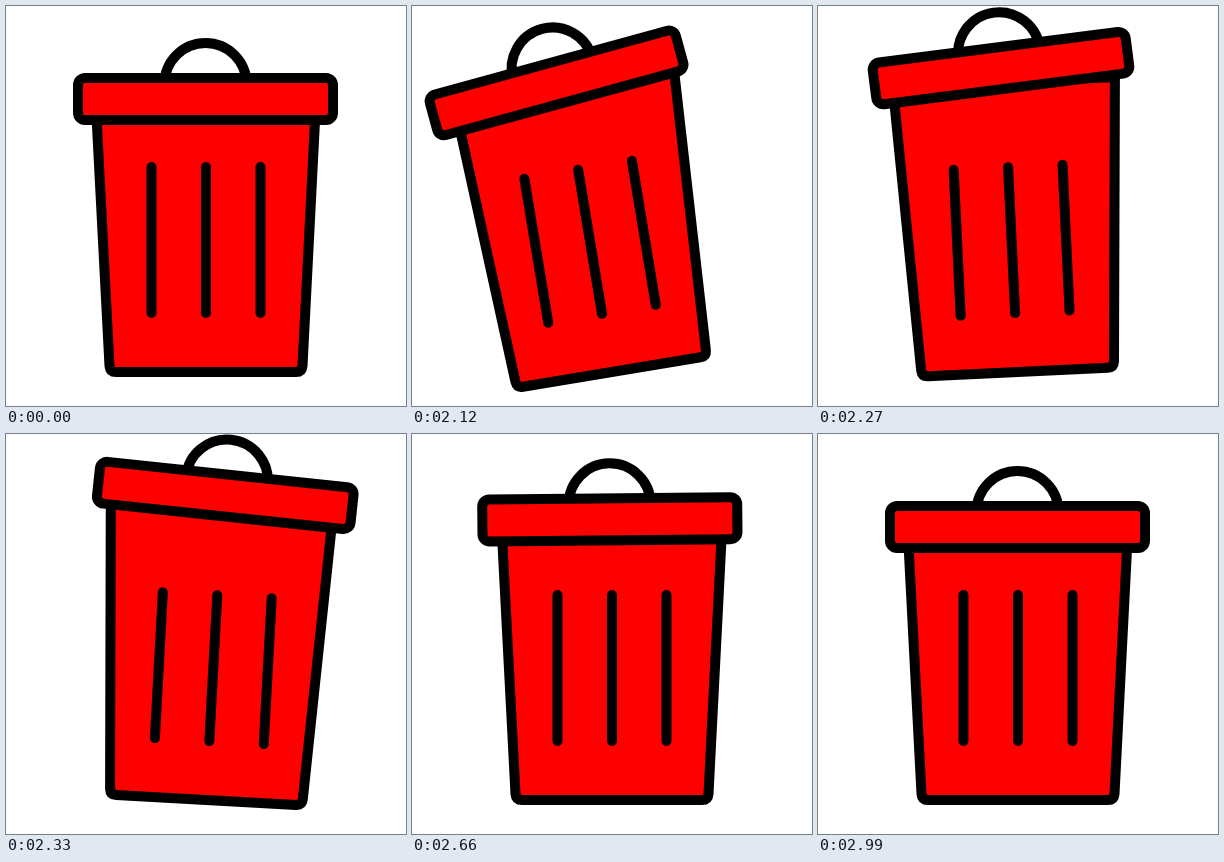
Write an HTML page that moves like this. It is 400 by 400 pixels and loops after 3080 ms.

```html
<!DOCTYPE html>
<html lang="en">
<head>
<meta charset="utf-8">
<title>Bin</title>
<style>
  html, body { margin: 0; width: 100%; height: 100%; overflow: hidden; background: #fff; }
  svg { display: block; width: 100%; height: 100%; }
</style>
</head>
<body>
<svg viewBox="0 0 400 400" fill="red" stroke="#000" stroke-width="10" stroke-linecap="round" stroke-linejoin="round">
  <g id="body">
    <path d="M88.7 76H311L296.5 360Q296 366 290 366H110Q104 366 103.5 360Z"/>
    <path d="M145.5 161V307M200 161V307M254.500 161V307"/>
  </g>
  <g id="lid">
    <path d="M158.500 78A41 41 0 0 1 240.500 78" fill="none"/>
    <rect x="72" y="72" width="255" height="42" rx="7"/>
  </g>
</svg>
<script>
const LOOP = 3080, REST = 2000, STEP = 30;
const body = document.getElementById('body');
const lid = document.getElementById('lid');

// Keys are [ms after the rest, value]; negative times make the start abrupt.
const tilt = [[-150, 9.9], [150, -9.9], [180, -9.9], [355, 3.8], [570, 0]];
const lidTurn = [[-190, 18], [186, -18], [396, 13], [670, -0.6], [850, 0]];
const lidX = [[-145, 57], [145, -57], [185, -57], [355, 24], [535, -5], [740, 0]];
const lidY = [[-110, 5], [310, -31.7], [830, 0]];

// Sine ease-in-out between neighbouring keys.
function at(keys, t) {
  const i = keys.findIndex(k => k[0] > t);
  if (t <= 0 || i < 0) return 0;
  const [t0, a] = keys[i - 1], [t1, b] = keys[i];
  return a + (b - a) * (1 - Math.cos(Math.PI * (t - t0) / (t1 - t0))) / 2;
}

function draw(now) {
  const t = Math.max(0, Math.floor((now % LOOP - REST) / STEP) * STEP);
  body.setAttribute('transform', `rotate(${at(tilt, t)} 200 368)`);
  lid.setAttribute('transform',
    `translate(${at(lidX, t)} ${at(lidY, t)}) rotate(${at(lidTurn, t)} 199.5 93)`);
}

const start = performance.now();
function frame() {
  draw(performance.now() - start);
  requestAnimationFrame(frame);
}
frame();
</script>
</body>
</html>
```
